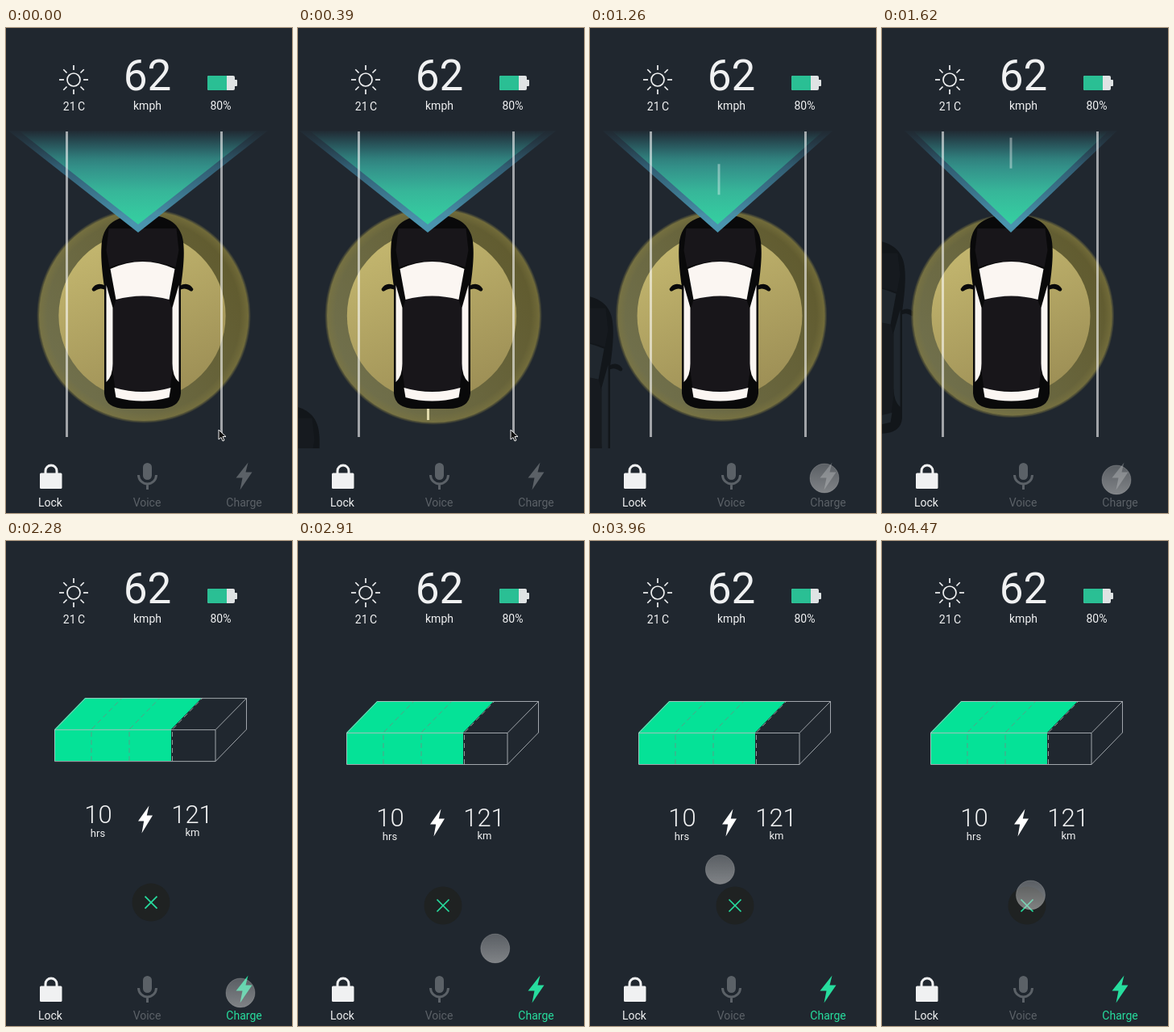
An HTML page that plays this animation: 355x600 px, repeating every 4.5 s.

```html
<!DOCTYPE html>
<html lang="en">
<head>
<meta charset="utf-8">
<title>Car dashboard</title>
<style>
  html, body { margin: 0; height: 100%; overflow: hidden; background: #20272f; }
  svg { display: block; width: 355px; height: 600px; font: 14px Roboto, sans-serif; text-anchor: middle; fill: #f0f1f2; }
  .big { font-size: 53px; }
  .mid { font-size: 31px; font-weight: 300; }
  .small { font-size: 13px; }
  .dim { fill: #5b6167; color: #5b6167; }
  .on { fill: #27dd9e; }
  .car { --body: #09090a; --panel: #18161a; --glass: #fbf6f2; }
  .ghost { --body: #12161a; --panel: #161a1f; --glass: #20272e; }
</style>
</head>
<body>
<svg viewBox="0 0 355 600">
  <defs>
    <linearGradient id="green" gradientUnits="userSpaceOnUse" x1="0" y1="127" x2="0" y2="243">
      <stop offset="0" stop-color="#2c8c88" stop-opacity="0"/>
      <stop offset=".3" stop-color="#33a893" stop-opacity=".55"/>
      <stop offset=".65" stop-color="#36c09b" stop-opacity=".87"/>
      <stop offset="1" stop-color="#34d0a0"/>
    </linearGradient>
    <linearGradient id="blue" gradientUnits="userSpaceOnUse" x1="0" y1="127" x2="0" y2="240">
      <stop offset="0" stop-color="#2f6076" stop-opacity=".05"/>
      <stop offset=".4" stop-color="#37708a" stop-opacity=".75"/>
      <stop offset="1" stop-color="#4a94ae"/>
    </linearGradient>
    <linearGradient id="olive" x1="0" y1=".8" x2="1" y2=".2">
      <stop stop-color="#72724f"/>
      <stop offset="1" stop-color="#5f592c"/>
    </linearGradient>
    <radialGradient id="rim">
      <stop offset=".9" stop-color="#7d7640" stop-opacity="0"/>
      <stop offset=".98" stop-color="#7d7640" stop-opacity=".6"/>
      <stop offset="1" stop-color="#7d7640" stop-opacity="0"/>
    </radialGradient>
    <linearGradient id="gold" x1=".3" x2=".7" y2="1">
      <stop stop-color="#c4b76f"/>
      <stop offset="1" stop-color="#9c8e55"/>
    </linearGradient>
    <linearGradient id="glossy" x2="0" y2="1">
      <stop stop-color="#ccc" stop-opacity=".34"/>
      <stop offset="1" stop-color="#ccc" stop-opacity=".56"/>
    </linearGradient>
    <clipPath id="road"><path d="M0 128H355V520H0Z"/></clipPath>
    <clipPath id="lane"><path d="M0 128H355V485H0Z"/></clipPath>
    <path id="bolt" d="M5-17L-10 2H-2L-5 17 10-5H2Z" stroke-linejoin="round"/>
    <path id="mirror" d="M-46 319Q-57 313-63 323-62 328-57 324-52 321-46 324Z" fill="var(--body)"/>
    <path id="window" d="M-45 318L-37 346V415Q-37 431-45 438Z" fill="var(--glass)"/>
    <g id="car">
      <use href="#mirror"/><use href="#mirror" transform="scale(-1 1)"/>
      <path fill="var(--body)" d="M-47.500 320C-50 303-52 284-51 270-50 241-30 231 0 231S50 241 51 270C52 284 50 303 47.500 320V452Q46 471 20 471H-20Q-46 471-47.500 452Z"/>
      <path fill="var(--panel)" d="M-42 248H42L45 275 41 296Q0 281-41 296L-45 275Z"/>
      <path fill="var(--panel)" d="M-33 336Q0 326 33 336L37 350V425L34 446Q0 452-34 446L-37 425V350Z"/>
      <path fill="var(--glass)" d="M-40 298Q0 280 40 298L33 336Q0 327-33 336Z"/>
      <use href="#window"/><use href="#window" transform="scale(-1 1)"/>
      <path fill="var(--glass)" d="M-35 445Q0 455 35 445L33 457Q0 466-33 457Z"/>
    </g>
  </defs>

  <g id="drive">
    <g clip-path="url(#road)"><use href="#car" id="other" class="ghost"/></g>
    <circle id="outer" fill="url(#olive)"/>
    <circle id="edge" fill="url(#rim)"/>
    <circle id="inner" fill="url(#gold)"/>
    <g clip-path="url(#lane)"><path id="dash" d="M161.500 0V38" stroke="#e0d9ac" stroke-width="3"/></g>
    <use href="#car" id="own" class="car"/>
    <path id="beam" fill="url(#blue)"/>
    <path id="core" fill="url(#green)"/>
    <g clip-path="url(#lane)"><path id="mark" d="M160 0V38" stroke="#fff" stroke-opacity=".38" stroke-width="3"/></g>
    <path d="M75.500 128V506M267.500 128V506" stroke="#fff" stroke-opacity=".58" stroke-width="3"/>
  </g>

  <g id="charge" stroke-width="1">
    <path fill="#05e297" d="M60 237L98 198H243L205 237V276H60Z"/>
    <g fill="none">
      <path stroke="#5a9d86" stroke-dasharray="6 4" d="M106 276V237L144 198M153 276V237L191 198"/>
      <path stroke="#8fa39d" stroke-dasharray="6 4" d="M206.500 276V237L244 198"/>
      <path stroke="#b9bec2" stroke-opacity=".85" d="M60.500 237.500H260V276.500H60.500ZL98.500 198.500H298.500L260 237.500M298.500 198.500V237L260 276.500"/>
    </g>
    <text class="mid" x="114.500" y="353">10</text>
    <text class="small" x="114" y="370">hrs</text>
    <use href="#bolt" transform="translate(173 348.500) scale(.9 1)" fill="#fff"/>
    <text class="mid" x="231" y="353">121</text>
    <text class="small" x="231.500" y="369">km</text>
    <circle cx="180" cy="451" r="23.500" fill="#1f2222"/>
    <path d="M172.500 443.500L187.500 458.500M187.500 443.500L172.500 458.500" stroke="#27dd9e" stroke-width="1.700"/>
  </g>

  <g fill="none" stroke="#f0f1f2" stroke-width="1.700">
    <circle cx="84" cy="64" r="8"/>
    <g id="rays" transform="translate(84 64)"></g>
  </g>
  <text x="84.500" y="102" word-spacing="-1">21 C</text>
  <text class="big" x="175.500" y="77">62</text>
  <text x="175.500" y="101">kmph</text>
  <rect x="250" y="59" width="34" height="18" rx="2" fill="#dfe3e4"/>
  <path d="M284 64H286Q287 64 287 65V71Q287 72 286 72H284Z" fill="#dfe3e4"/>
  <path d="M252 59H274V77H252Q250 77 250 75V61Q250 59 252 59Z" fill="#2abf94"/>
  <text x="266.500" y="101">80%</text>

  <path d="M49 553V548A7 7 0 0 1 63 548V553" fill="none" stroke="#f0f1f2" stroke-width="3"/>
  <rect x="42" y="550.500" width="27.500" height="19.500" rx="1.500"/>
  <text x="55" y="591.500">Lock</text>
  <g class="dim">
    <rect x="170" y="538" width="11" height="21" rx="5.500"/>
    <path d="M164.500 553A11 11 0 0 0 186.500 553M175.500 564V571" fill="none" stroke="currentColor" stroke-width="3"/>
    <text x="175" y="591.500">Voice</text>
  </g>
  <g id="tab">
    <use href="#bolt" x="295.500" y="554.500"/>
    <text x="295.500" y="591.500">Charge</text>
  </g>

  <path id="cursor" d="M0 0V12L3 9.500 5 14 7 13 5 8.500H9Z" fill="#111" stroke="#eee"/>
  <circle id="touch" r="18" fill="url(#glossy)" stroke="#ccc" stroke-opacity=".25"/>
</svg>
<script>
const $ = id => document.getElementById(id);
const set = (id, attrs) => { for (const k in attrs) $(id).setAttribute(k, attrs[k]); };
const move = (id, x, y) => set(id, { transform: `translate(${x} ${y})` });
const show = (id, on) => set(id, { opacity: +on });

// Interpolates [time, value] pairs, optionally with an easing per segment.
function track(t, keys, ease = u => u) {
  if (t <= keys[0][0]) return keys[0][1];
  for (let i = 1; i < keys.length; i++) {
    const [t0, a] = keys[i - 1], [t1, b] = keys[i];
    if (t < t1) return a + (b - a) * ease((t - t0) / (t1 - t0));
  }
  return keys[keys.length - 1][1];
}
const smooth = u => u * u * (3 - 2 * u);
const easeOut = u => 1 - (1 - u) ** 3;

$('rays').innerHTML = Array.from({ length: 8 }, (_, i) =>
  `<path d="M12 0H18" transform="rotate(${i * 45})"/>`).join('');

const triangle = (x, half, tip) => `M${x - half} 127H${x + half}L${x} ${tip}Z`;

function draw(t) {
  const carX = track(t, [[0, 169.5], [780, 163.5], [1260, 161.5], [1620, 160.5]]);
  const radius = track(t, [[0, 132], [500, 134.5], [780, 134.5], [1260, 130.5], [1620, 125.5], [1900, 123], [2200, 125]]);
  const tipX = track(t, [[0, 164], [780, 158], [1260, 158.5], [1620, 160]]);
  const half = track(t, [[0, 161], [780, 158], [1260, 143], [1620, 132], [1850, 128], [2200, 136]]);

  show('drive', track(t, [[2140, 1], [2230, 0]]));
  move('own', carX, 0);
  const ring = { cx: carX + 1.5, cy: 356 };
  set('outer', { ...ring, r: radius - 2 });
  set('edge', { ...ring, r: radius + 1 });
  set('inner', { cx: carX - .5, cy: 356, r: radius * .785 });
  set('beam', { d: triangle(tipX, half, 253) });
  set('core', { d: triangle(tipX, half * .92, 243) });
  move('other', track(t, [[780, -24.5], [1260, -22.5]]),
    track(t, [[0, 296], [780, 174], [1260, 99], [1620, 31], [2230, -84]]));

  // The lane mark passes beneath the car and over the beam.
  const markY = 105 + (t * .89) % 353;
  move('dash', 0, markY);
  move('mark', 0, markY);
  show('dash', markY > 235);
  show('mark', markY <= 235 && t > 60);

  show('charge', track(t, [[2180, 0], [2260, 1]]));
  move('charge', 0, track(t, [[2180, -20], [2420, 0]], easeOut));
  set('tab', { class: t < 2200 ? 'dim' : 'on' });

  move('cursor', track(t, [[850, 264], [1050, 288]], smooth), track(t, [[850, 497], [1050, 550]], smooth));
  show('cursor', t < 1050);
  move('touch',
    track(t, [[1260, 291], [2550, 291], [3480, 153], [3700, 153], [4470, 184.5]], smooth),
    track(t, [[1260, 557], [1620, 559], [2550, 559], [3480, 395], [3700, 395], [4470, 438]], smooth));
  show('touch', t >= 1050);
}

const start = performance.now();
(function frame() {
  draw((performance.now() - start) % 4500);
  requestAnimationFrame(frame);
})();
</script>
</body>
</html>
```
